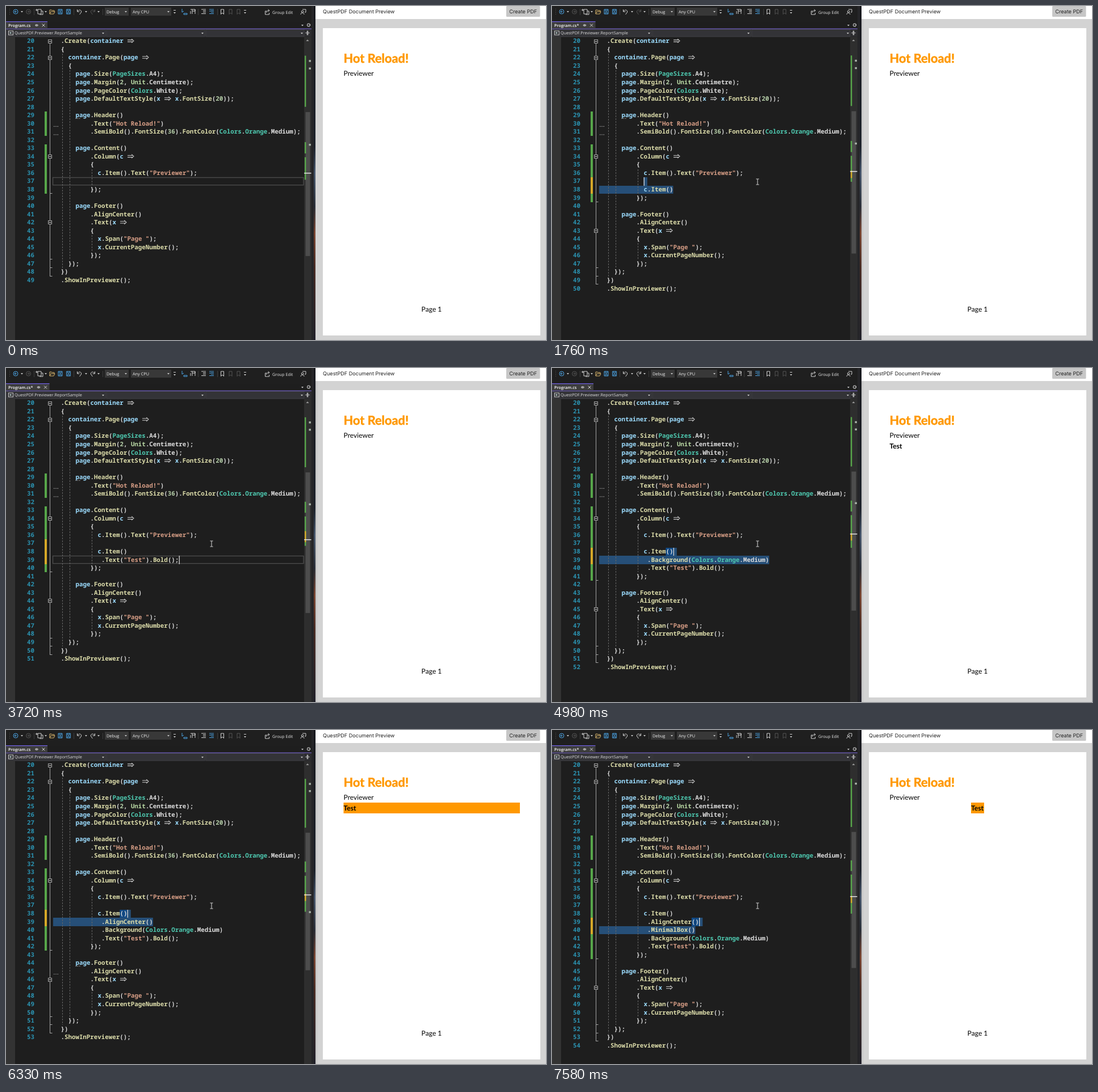
An HTML page that plays this animation: 951x589 px, repeating every 8 s.

```html
<!DOCTYPE html>
<html lang="en">
<head>
<meta charset="utf-8">
<title>Hot reload</title>
<style>
  html, body { margin: 0; width: 100%; height: 100%; overflow: hidden; background: #1e1e1e; }
  svg { display: block; width: 100vw; height: 100vh; }
  text { white-space: pre; text-rendering: geometricPrecision; }
  .code { font: 600 10.83px "Noto Sans Mono", "DejaVu Sans Mono", monospace; }
  .ui { font: 7.3px "Open Sans", "Noto Sans", sans-serif; }
  .bold { font-weight: 600; }
  .app { font: 9.1px Inter, sans-serif; }
  .doc { font: 12.1px Lato, sans-serif; }
  .title { font: 700 21.8px Lato, sans-serif; stroke: #ff9800; stroke-width: .5; }
  .strong { font-weight: 700; }
  .icon { fill: none; stroke: #d0d0d0; stroke-width: 1; }
  .blue { stroke: #4ba3e3; }
  .dim { stroke: #555; }
  .gold { stroke: #d8b46a; }
</style>
</head>
<body>
<svg viewBox="0 0 951 589" preserveAspectRatio="none">
  <defs>
    <linearGradient id="desk" x1="0" y1="0" x2="0" y2="1">
      <stop offset="0" stop-color="#17181d"/>
      <stop offset=".42" stop-color="#1d222b"/>
      <stop offset=".5" stop-color="#46566c"/>
      <stop offset=".6" stop-color="#2b3039"/>
      <stop offset=".68" stop-color="#7a4531"/>
      <stop offset=".78" stop-color="#4a2c24"/>
      <stop offset="1" stop-color="#20202a"/>
    </linearGradient>
    <linearGradient id="shade">
      <stop offset="0" stop-color="#000" stop-opacity=".1"/>
      <stop offset="1" stop-color="#000" stop-opacity="0"/>
    </linearGradient>
  </defs>
  <g id="frame"></g>
  <g id="live"></g>
  <g id="mouse"></g>
</svg>
<script>
const LOOP = 8000, LEFT = 96.4, CW = 6.5, LH = 14.54;
const $ = id => document.getElementById(id);
const colX = c => LEFT + c * CW;
const lineY = n => 61.5 + (n - 20) * LH;
const topY = n => Math.round(lineY(n) - 6.6);

const rect = (x, y, w, h, fill, more = '') =>
  `<rect x="${x}" y="${y}" width="${w}" height="${h}" fill="${fill}" ${more}/>`;
const rows = (x, w, a, b, fill) => rect(x, topY(a), w, topY(b + 1) - topY(a), fill);
const text = (x, y, s, fill, cls, more = '') =>
  `<text x="${x}" y="${y}" fill="${fill}" class="${cls}" ${more}>${s}</text>`;
const path = (d, cls = '') => `<path class="icon ${cls}" d="${d}"/>`;
const line = (d, color, width = 1, more = '') =>
  `<path d="${d}" fill="none" stroke="${color}" stroke-width="${width}" ${more}/>`;
const drop = (x, y) => `<path d="M${x - 2} ${y - 1}h4l-2 2.4z" fill="#ccc"/>`;

// Code: fixed head and tail with restored lines between them
const HEAD = `.Create(container =>
{
  container.Page(page =>
  {
    page.Size(PageSizes.A4);
    page.Margin(2, Unit.Centimetre);
    page.PageColor(Colors.White);
    page.DefaultTextStyle(x => x.FontSize(20));

    page.Header()
        .Text("Hot Reload!")
        .SemiBold().FontSize(36).FontColor(Colors.Orange.Medium);

    page.Content()
        .Column(c =>
        {
          c.Item().Text("Previewer");
`.split('\n');
const TAIL = `        });

    page.Footer()
        .AlignCenter()
        .Text(x =>
        {
          x.Span("Page ");
          x.CurrentPageNumber();
        });
  });
})
.ShowInPreviewer();`.split('\n');
const ITEM = '          c.Item()';
const CALLS = ['.MinimalBox()', '.AlignCenter()', '.Background(Colors.Orange.Medium)', '.Text("Test").Bold();']
  .map(s => ' '.repeat(11) + s);

function source(added) {
  const calls = added > 1 ? CALLS.slice(5 - added) : [];
  // the alignment call always precedes the box call
  if (added === 5) calls.splice(0, 2, CALLS[1], CALLS[0]);
  return [...HEAD, ...(added ? [ITEM] : []), ...calls, ...TAIL];
}

const TOKEN = /("[^"]*")|\b(page|container|c|x)\b|\b(Colors|PageSizes|Orange)\b|\b(Unit)\b|(\w+)(?=\()|\b(\d+)\b/g;
const HUES = ['#d69d85', '#9cdcfe', '#4ec9b0', '#b8d7a3', '#dcdcaa', '#b5cea8'];
const paint = s => s.replace(TOKEN, (m, ...g) =>
  `<tspan fill="${HUES[g.slice(0, 6).findIndex(Boolean)]}">${m}</tspan>`);

function codeLine(s, n) {
  const indent = s.length - s.trimStart().length, at = s.indexOf('=>'), y = lineY(n);
  let out = text(37, y + 3.8, n, '#2b91af', 'code');
  if (s) out += text(colX(indent), y + 3.8, paint(s.trim().replace('=>', '  ')), '#dcdcdc', 'code');
  if (at > 0) {
    out += line(`M${colX(at) + .6} ${y - 1.6}h9.5m-9.5 3.2h9.5m-2.3 -5l3.8 3.4-3.8 3.4`, '#c8c8c8', 1.1);
  }
  return out;
}

// Timeline: each entry changes part of the state
const EVENTS = [
  [0, { added: 0, caret: [37, 10], on: false, sel: false, brace: null, fresh: null,
        dirty: false, focus: false, squiggle: false, redo: false, hint: 0, result: 0 }],
  [830, { focus: true }],
  [930, { on: true }],
  [1500, { on: false }],
  [1710, { added: 1, sel: true, on: true, fresh: [37, 38] }],
  [1760, { dirty: true }],
  [2220, { on: false, squiggle: true }],
  [2600, { sel: false, caret: [38, 18], on: true }],
  [2700, { brace: [38, 16, 17] }],
  [2930, { added: 2, sel: true, squiggle: false, fresh: [37, 39] }],
  [3260, { redo: true }],
  [3410, { sel: false, caret: [39, 32], brace: null }],
  [4050, { dirty: false, fresh: null }],
  [4140, { result: 1 }],
  [4620, { on: false }],
  [4980, { added: 3, sel: true, caret: [38, 18], on: true, brace: [38, 16, 17], fresh: [38, 39] }],
  [5110, { dirty: true }],
  [5390, { sel: false, caret: [39, 44], brace: null }],
  [5490, { brace: [39, 22, 43], hint: 1 }],
  [5620, { dirty: false, fresh: null }],
  [5770, { result: 2 }],
  [6050, { on: false }],
  [6330, { added: 4, sel: true, caret: [38, 18], on: true, brace: [38, 16, 17], fresh: [38, 39] }],
  [6480, { dirty: true }],
  [6660, { hint: 2 }],
  [6860, { dirty: false, fresh: null, on: false }],
  [6950, { result: 3 }],
  [7150, { sel: false, caret: [39, 25] }],
  [7300, { brace: [39, 23, 24], on: true }],
  [7530, { added: 5, sel: true, fresh: [39, 40] }],
  [7580, { dirty: true }]
];

function toolbar() {
  let s = rect(0, 0, 538, 28, '#1f1f1f');
  s += line('M6.5 5v11', '#555', 1, 'stroke-dasharray="1 2"');
  s += path('M13 10a4 4 0 1 1 8 0a4 4 0 1 1-8 0M19 10h-4m2-2l-2 2 2 2', 'blue');
  s += path('M35.5 10a4 4 0 1 1 8 0a4 4 0 1 1-8 0M37.5 10h4m-2-2l2 2-2 2', 'dim');
  s += path('M56 6h6v8h-6zM62 9h3v6h-6M54 5v4m-2-2h4');
  s += path('M77 14v-7h3l1 1h4v2M77 14l2-4h7l-2 4z', 'gold');
  for (const x of [92, 106.5]) s += path(`M${x} 6h7v8h-7zM${x + 2} 6v3h3v-3M${x + 2} 14v-3h3v3`, 'blue');
  s += path('M125.5 6v4h4M125.5 10c3-5 8-3 7 1l-3 4');
  s += rect(174, 3, 42, 14, '#383838') + rect(220, 3, 71, 14, '#383838');
  s += text(177, 12.7, 'Debug', '#eee', 'ui') + text(223, 12.7, 'Any CPU', '#eee', 'ui');
  s += path('M310 5v6l3-2M313 13h6v2h-6z', 'blue') + path('M325 6h3v8m0-8h5v3h-5m5-3v8M325 9v5');
  s += path('M344 6h8m-5 2.5h5m-5 2.5h5m-8 2.5h8') + path('M358 6h8m-5 2.5h5m-5 2.5h5m-8 2.5h8M358 9h3', 'blue');
  s += path('M378.5 6h5v8.5l-2.5-2.5-2.5 2.5z');
  for (const x of [393, 407]) s += path(`M${x} 6h5v8.5l-2.5-2.5-2.5 2.5z`, 'dim');
  for (const x of [49, 119, 170, 338, 372]) s += line(`M${x + .5} 5v11`, '#3d3d3d');
  for (const x of [28, 70, 141, 211, 286]) s += drop(x, 10);
  for (const x of [297, 421]) s += line(`M${x - 2} 7.5h4`, '#ccc') + drop(x, 12);
  s += path('M459 9h-2.5v6h7v-3M458.5 12c0-3 2-4 5-4m-2-2l2.5 2-2.5 2');
  s += text(469, 14, 'Group Edit', '#e6e6e6', 'ui');
  s += path('M519 15c0-4 6-4 6 0M520.3 10a1.8 1.8 0 1 1 3.6 0a1.8 1.8 0 1 1-3.6 0M522 6h6v5h-2');
  return s;
}

function frame() {
  let s = rect(0, 0, 951, 589, '#1e1e1e') + toolbar();
  s += rect(0, 39.5, 538, 1.6, '#6355a6') + drop(522, 34);
  s += '<circle cx="533" cy="33.5" r="2.4" fill="none" stroke="#ccc" stroke-width="1.8" stroke-dasharray="1.4 .6"/>';
  s += rect(0, 41, 538, 13.5, '#2d2d30');
  for (const [x, w] of [[1, 174], [177, 173], [352, 173]]) {
    s += rect(x, 41.5, w, 12.5, '#333337', 'stroke="#434346" stroke-width=".8"') + drop(x + w - 4, 48);
  }
  s += rect(4.5, 44, 8, 7, 'none', 'stroke="#ccc"') + rect(6.5, 46, 3, 3, '#9aa');
  s += text(15, 50.3, 'QuestPDF.Previewer.ReportSample', '#ddd', 'ui');
  s += line('M531 43.5v8m-3.5-4h7m-5-2.5h3m-3 5h3', '#ddd');
  s += rect(0, 54.5, 16, 535, '#333') + rect(525, 54.5, 13, 535, '#2e2e2e');
  s += '<path d="M528.5 62h5l-2.5-3z" fill="#999"/>';

  s += rect(538, 0, 4, 589, '#252528') + rect(542, 0, 3, 589, 'url(#desk)');
  s += rect(545, 0, 406, 589, '#d3d3d3') + rect(545, 0, 406, 23, '#fff');
  s += text(558, 13.4, 'QuestPDF Document Preview', '#222', 'app');
  s += rect(881, 0, 59.5, 19, '#c6c6c6', 'rx="1.5"') + text(886.3, 13, 'Create PDF', '#222', 'app');
  s += rect(558, 39, 383, 542, '#fff');
  s += text(594.5, 100, 'Hot Reload!', '#ff9800', 'title');
  s += text(594.5, 123, 'Previewer', '#000', 'doc');
  return s + text(749.5, 539, 'Page 1', '#000', 'doc', 'text-anchor="middle"');
}

function folding(n) {
  const end = topY(49 + n);
  let s = line(`M77.5 61V${end}`, '#a5a5a5');
  for (const k of [39, 47, 48, 49]) s += line(`M77.5 ${topY(k + n) - .5}h4`, '#a5a5a5');
  for (const k of [20, 22, 34, 42 + n]) {
    const y = Math.round(lineY(k)) + .5;
    s += rect(74.5, y - 3, 6, 6, '#1e1e1e', 'stroke="#a5a5a5"') + line(`M75.5 ${y}h4`, '#ddd');
  }
  const guides = [[0, 22, 48 + n], [2, 24, 47 + n], [8, 36, 38 + n], [8, 44 + n, 46 + n]];
  for (const [c, a, b] of guides) {
    s += line(`M${Math.floor(colX(c) + 2.6) + .5} ${topY(a)}V${topY(b)}`, '#666', 1, 'stroke-dasharray="3 2"');
  }
  return s;
}

function scrollMap(st) {
  const k = 570 / (86 + st.added), at = n => 54.5 + (n - 1) * k;
  const bar = (a, b, color) => rect(526, at(a), 2.4, (b - a) * k, color);
  let s = rect(527.5, at(21), 8, 38.3 * k, '#4d4d4d', 'id="thumb"');
  s += bar(6, 19.6, '#57a64a') + bar(29, 32, '#57a64a') + bar(33, 39 + st.added, '#57a64a');
  if (st.fresh) s += bar(st.fresh[0], st.fresh[1] + 1, '#d7a928');
  for (const n of [[7.4, 9.4, 29.7], [7.4, 9.4, 43.1], [7.4]][st.hint]) {
    s += rect(533.5, at(n) - 1.7, 3.4, 3.4, '#a9b4a9');
  }
  return s + rect(525, Math.round(at(st.caret[0] + .3) - 1), 12.5, 1.5, '#e4e4e4');
}

function editor(st) {
  const lines = source(st.added), [row, col] = st.caret, n = st.added;
  const marks = (a, b, color) => rows(68, 4, a, b, color);
  const dots = (x, y) => line(`M${x} ${y}h8`, '#a0a0a0', 1.2, 'stroke-dasharray="1.5 1.75"');
  const hintAt = k => dots(122.5, lineY(k) + 6) + dots(84, lineY(k + 1) + 5.5);
  let s = marks(29, 31, '#57a64a') + marks(33, 38 + n, '#57a64a');
  if (st.fresh) s += marks(...st.fresh, '#d7a928');
  if (st.sel) {
    s += rows(colX(col), 6.4, row, row, '#264f78');
    s += rows(83, colX(lines[row - 19].length) - 83, row + 1, row + 1, '#264f78');
  } else {
    s += rect(82.5, topY(row) + .5, 441.5, 13.2, 'none', 'stroke="#4a4a4a" stroke-width="1.4"');
  }
  if (st.brace) {
    const [r, ...cols] = st.brace;
    for (const c of cols) s += rows(colX(c), CW, r, r, '#114a86');
  }
  s += folding(n) + lines.map((l, i) => codeLine(l, i + 20)).join('');
  if (st.hint === 0) s += hintAt(29) + dots(84, lineY(31) + 5.5);
  if (st.hint === 1) s += hintAt(40 + n);
  if (st.squiggle) s += line(`M215.5 ${lineY(38) + 5.5}l1.5 1.5 1.5-1.5 1.5 1.5 1-1`, '#9a9a9a', .8);
  if (st.on) s += rows(colX(col) + .2, 1.2, row, row, '#e6e6e6');
  return s;
}

function tab(dirty) {
  const shift = dirty ? 3.5 : 0;
  return rect(0, 27, 73 + shift, 12.5, '#3d3d3d') + rect(0, 27, 73 + shift, 1.2, '#7160e8') +
    text(4, 36.6, 'Program.cs' + (dirty ? '*' : ''), '#fff', 'ui bold') +
    path(`M${51 + shift} 34h2m0-2v4m0-3h3v2h-3`) + path(`M${63.5 + shift} 31.5l5 5m0-5l-5 5`);
}

function preview(result) {
  if (!result) return '';
  const x = result === 3 ? 738 : 594.5;
  const back = result === 1 ? '' : rect(x, 128, result === 2 ? 310.5 : 23, 19, '#ff9800');
  return back + text(x, 142, 'Test', '#000', 'doc strong');
}

function draw(st) {
  const tone = st.redo ? '' : 'dim';
  return tab(st.dirty) + path('M156.5 6v4h-4M156.5 10c-3-5-8-3-7 1l3 4', tone) + drop(163, 10) +
    editor(st) + scrollMap(st) + preview(st.result) +
    (st.focus ? rect(545, 0, 4, 589, 'url(#shade)') : '');
}

const ARROW = '<path d="M0 0v11.5l2.7-2.5 1.8 4 1.8-.8-1.8-3.9h3.7z" fill="#fff" stroke="#000" stroke-width=".8"/>';
const IBEAM = line('M-2.5 -5h2q.5 0 .5 .6v8.8q0 .6-.5 .6h-2M2.5 -5h-2q-.5 0-.5 .6M0 4.4q0 .6 .5 .6h2', '#ddd');

function moveMouse(t) {
  const tick = Math.floor((t - 30) / 50) * 50;
  const p = Math.min(1, Math.max(0, tick / 650));
  const e = p * p * (3 - 2 * p);
  const x = 895 + (362 - 895) * e, y = 588 + (310 - 588) * e;
  const mouse = $('mouse');
  const shape = t < 30 ? '' : x < 525 ? IBEAM : ARROW;
  if (mouse.shape !== shape) mouse.innerHTML = mouse.shape = shape;
  mouse.setAttribute('transform', `translate(${x} ${y})`);
  $('thumb').setAttribute('fill', t >= 30 && x > 524 && x < 545 ? '#8a8a8a' : '#4d4d4d');
}

$('frame').innerHTML = frame();
let shown = 0;
const start = performance.now();
function tick() {
  const t = Math.max(0, performance.now() - start) % LOOP;
  const past = EVENTS.filter(e => e[0] <= t);
  if (past.length !== shown) {
    shown = past.length;
    $('live').innerHTML = draw(Object.assign({}, ...past.map(e => e[1])));
  }
  moveMouse(t);
  requestAnimationFrame(tick);
}
tick();
</script>
</body>
</html>
```
